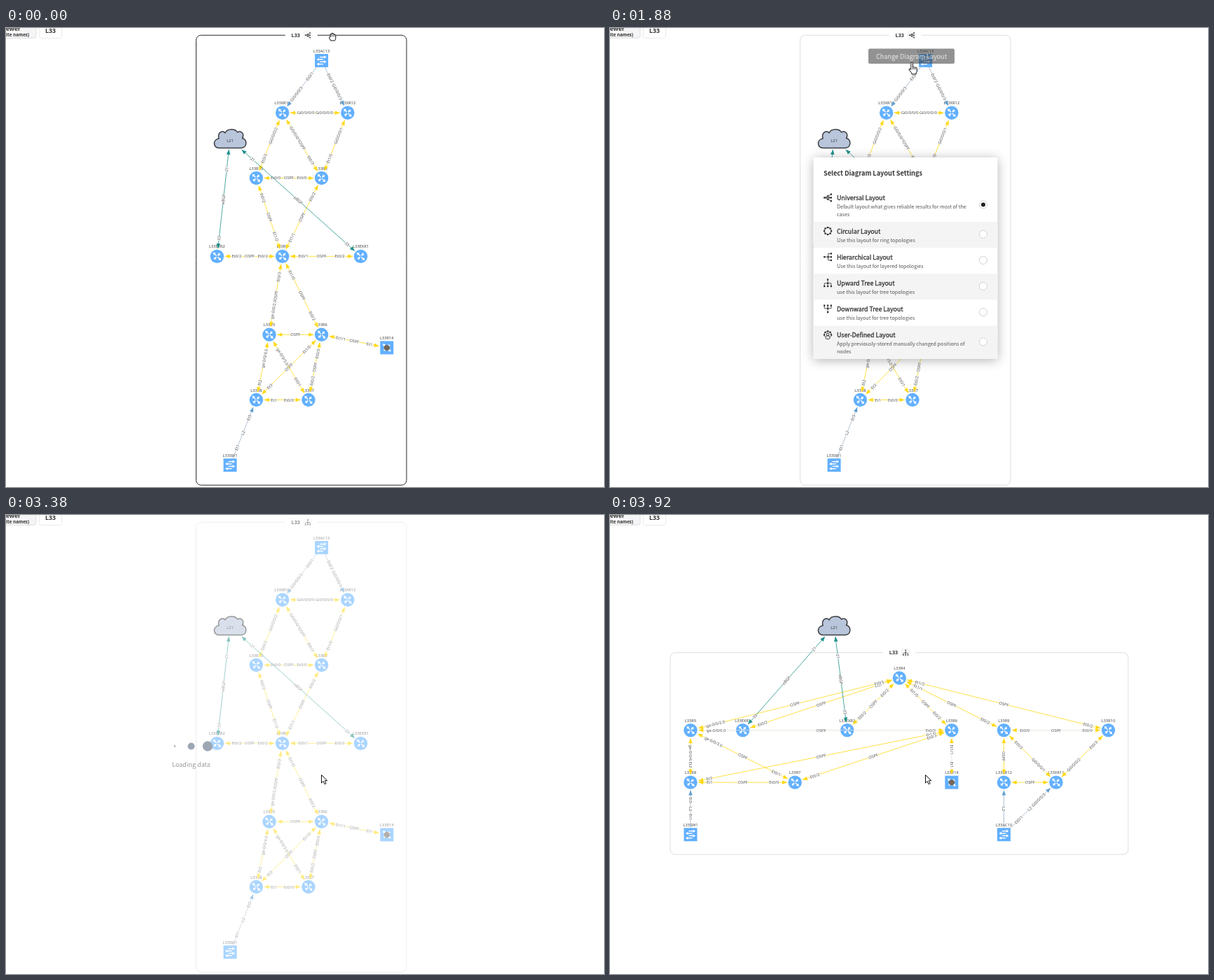
An HTML page with a canvas for the animation above (5700 ms loop, 854x656 px).

```html
<!DOCTYPE html>
<html lang="en">
<head>
<meta charset="utf-8">
<title>Diagram layout</title>
<style>
html, body { margin: 0; width: 100%; height: 100%; overflow: hidden; background: #fff; }
canvas { display: block; }
</style>
</head>
<body>
<canvas id="stage" width="854" height="656"></canvas>
<script>
const c = document.getElementById('stage').getContext('2d');
const LOOP = 5700;
const UI = '"Noto Sans CJK SC", "Noto Sans CJK JP", "Noto Sans CJK", "Noto Sans", sans-serif';
const NET = '"Noto Sans", "Open Sans", sans-serif';
const SMALL = `5.7px ${NET}`;
const BLUE = '#62b0ff', YELLOW = '#ffd814', TEAL = '#1f918a';

const clamp = v => Math.max(0, Math.min(1, v));
const ramp = (t, a, b) => clamp((t - a) / (b - a));
const ease = v => v * v * (3 - 2 * v);

// Node places in grid units
function place(spec, x0, y0, unit) {
  const nodes = { L21: { x: 320, y: 159, cloud: true } };
  for (const part of spec.split(' ')) {
    const [name, gx, gy] = part.split(',');
    nodes[name] = { x: x0 + gx * unit, y: y0 + gy * unit };
  }
  return nodes;
}
const universal = {
  nodes: place('AC13,8,0 XR11,5,4 XR12,10,4 R10,3,9 R9,8,9 EXR2,0,15 R4,5,15 EXR1,11,15 ' +
    'R5,4,21 R6,8,21 R14,13,22 R8,3,26 R7,7,26 SW1,1,31', 301.4, 46.6, 18.65),
  box: [271.5, 10.3, 300.5, 643], icon: 'universal', pale: []
};
const upward = {
  nodes: place('R4,4,0 R5,0,1 EXR1,1,1 EXR2,3,1 R6,5,1 R9,6,1 R10,8,1 R8,0,2 R7,2,2 ' +
    'R14,5,2 XR12,6,2 XR11,7,2 SW1,0,3 AC13,6,3', 115, 233, 74.58),
  box: [86, 196.7, 654, 288.5], icon: 'upward', pale: ['R5R6', 'R9R10', 'R6R14']
};

// from, to, label at start, middle and end
const links = `R4 EXR1 Et0/1 OSPF Et0/2
R4 R5 Et0/3 OSPF ge-0/0/2.0
R4 EXR2 Et0/2 OSPF Et0/2
R4 R9 Et1/1 OSPF Et0/2
R4 R10 Et1/2 OSPF Et0/2
R4 R6 Et1/0 OSPF Et0/2
R5 R6 ge-0/0/0.0 OSPF Et0/0
R6 R8 Et1/0 OSPF Et3
R6 R7 Et0/3 OSPF Et0/2
R5 R7 ge-0/0/3.0 OSPF Et0/1
R5 R8 ge-0/0/4.0 OSPF Et2
R8 R7 Et1 OSPF Et0/0
R6 R14 Et1/1 OSPF Et1
R9 R10 Et0/0 OSPF Et0/0
R9 XR12 Et1/0 OSPF Gi0/0/0/1
R9 XR11 Et0/3 OSPF Gi0/0/0/1
R10 XR11 Et0/3 OSPF Gi0/0/0/2
XR11 XR12 Gi0/0/0/0 OSPF Gi0/0/0/0
AC13 XR11 Et0/1 L2 Gi0/0/0/3
AC13 XR12 Et0/2 L2 Gi0/0/0/3
SW1 R8 Et1 L2 Et5
L21 EXR1 21 eBGP 33
L21 EXR2 21 eBGP 33`.split('\n').map(s => s.split(' '));

function text(s, x, y, font, color, align = 'center', weight = 0) {
  c.font = font;
  c.fillStyle = c.strokeStyle = color;
  c.textAlign = align;
  c.fillText(s, x, y);
  if (weight) {
    c.lineWidth = weight;
    c.strokeText(s, x, y);
  }
}
function line(color, width, ...pts) {
  c.strokeStyle = color;
  c.lineWidth = width;
  c.beginPath();
  for (let i = 0; i < pts.length; i += 2) c.lineTo(pts[i], pts[i + 1]);
  c.stroke();
}
function disc(x, y, r, color) {
  c.fillStyle = color;
  c.beginPath();
  c.arc(x, y, r, 0, 7);
  c.fill();
}
function panel(x, y, w, h, r, fill, stroke) {
  c.beginPath();
  c.roundRect(x, y, w, h, r);
  if (fill) { c.fillStyle = fill; c.fill(); }
  if (stroke) { c.strokeStyle = stroke; c.lineWidth = 1; c.stroke(); }
}
function head(x, y, angle, len, half, color) {
  c.save();
  c.translate(x, y);
  c.rotate(angle);
  c.fillStyle = color;
  c.beginPath();
  c.moveTo(0, 0);
  c.lineTo(-len, -half);
  c.lineTo(-len, half);
  c.fill();
  c.restore();
}

const cloud = new Path2D('M304 171.5C295.500 171 295 159.500 304 158C301.500 149 309.500 145.500 313 150' +
  'C315.500 143.500 327.500 143.500 330.500 149C336 146 341 151.500 337.500 157.500C345.500 160 344 171 336 171.500Z');

function drawNode(name, n) {
  if (n.cloud) {
    c.fillStyle = '#b9c5da';
    c.strokeStyle = '#3b3d42';
    c.lineWidth = 1.5;
    c.fill(cloud);
    c.stroke(cloud);
    text(name, n.x, 163, SMALL, '#333');
    return;
  }
  c.save();
  c.translate(n.x, n.y);
  const isSwitch = /AC|SW/.test(name), isSquare = isSwitch || name === 'R14';
  if (isSquare) {
    c.fillStyle = BLUE;
    c.fillRect(-9.5, -9.5, 19, 19);
  } else disc(0, 0, 9.7, BLUE);
  if (isSwitch) {
    [-5, -1.7, 1.7, 5].forEach((y, i) => {
      const dir = i % 2 ? -1 : 1;
      line('#fff', 1.4, -2.5 * dir, y, 4.5 * dir, y);
      head(7 * dir, y, dir > 0 ? 0 : Math.PI, 3.4, 2.2, '#fff');
    });
  } else {
    for (let i = 0; i < 4; i++) {
      const a = Math.PI / 4 + i * Math.PI / 2, x = Math.cos(a), y = Math.sin(a);
      line('#fff', 1.4, x * 1.2, y * 1.2, x * 6, y * 6);
      if (i % 2) head(x * 1.6, y * 1.6, a + Math.PI, 3.2, 2.2, '#fff');
      else head(x * 8, y * 8, a, 3.4, 2.4, '#fff');
    }
    if (isSquare) disc(0, 0, 4, '#75685a');
  }
  text('L33' + name, 0, -11.9, SMALL, '#444');
  c.restore();
}

function drawLink([from, to, start, mid, end], { nodes, pale }) {
  const a = nodes[from], b = nodes[to];
  const dx = b.x - a.x, dy = b.y - a.y, len = Math.hypot(dx, dy);
  const ux = dx / len, uy = dy / len, angle = Math.atan2(dy, dx);
  const tipA = a.cloud ? 14.8 / Math.abs(uy) : mid === 'L2' ? 10 : 11.3, tipB = len - 11.3;
  const at = d => [a.x + ux * d, a.y + uy * d];
  const color = mid === 'L2' ? '#9db2ca' : a.cloud ? TEAL : YELLOW;
  const tip = mid === 'L2' ? '#5f9fce' : color;
  line(pale.includes(from + to) ? '#e2e0d4' : color, .8, ...at(tipA), ...at(tipB));
  head(...at(tipB), angle, 7, 2.8, tip);
  if (mid !== 'L2') head(...at(tipA), angle + Math.PI, 7, 2.8, tip);

  c.font = SMALL;
  const [ws, wm, we] = [start, mid, end].map(s => c.measureText(s).width);
  const pad = len < 100 ? 21 : 23;
  const turn = angle > Math.PI / 2 + .001 ? angle - Math.PI
    : angle < -Math.PI / 2 + .001 ? angle + Math.PI : angle;
  const label = (s, w, d) => {
    c.save();
    c.translate(...at(d));
    c.rotate(turn);
    c.fillStyle = '#fff';
    c.fillRect(-w / 2, -2.8, w, 5.6);
    text(s, 0, 2, SMALL, '#505050');
    c.restore();
  };
  // Labels that would collide are hidden
  const ends = ws + we < len - 2 * pad + 4.5;
  if (ends) {
    label(start, ws, (a.cloud ? 40 : pad) + ws / 2);
    label(end, we, len - pad - we / 2);
  }
  if (!ends || wm / 2 + pad + Math.max(ws, we) < len / 2 + 1.3) label(mid, wm, (tipA + tipB) / 2);
}

function icon(kind, x, y, size) {
  const ink = '#333';
  const dots = (...p) => {
    for (let i = 0; i < p.length; i += 2) {
      c.fillStyle = ink;
      c.fillRect(p[i] - 1.15, p[i + 1] - 1.15, 2.3, 2.3);
    }
  };
  c.save();
  c.translate(x, y);
  c.scale(size, size);
  if (kind === 'universal') {
    line(ink, .8, 4.5, -4.5, -4.5, 0, 4.5, 4.5);
    line(ink, .8, -4.5, 0, 4.5, 0);
    line(ink, .8, 0, -2, 4.5, 0, 0, 2);
    dots(-4.8, 0, 0, -2.2, 0, 2.2, 4.8, -4.8, 4.8, 0, 4.8, 4.8);
  } else if (kind === 'circular' || kind === 'user') {
    c.strokeStyle = ink;
    c.lineWidth = .7;
    c.beginPath();
    if (kind === 'user') c.arc(0, 0, 5, 2.4, 7.1);
    else c.arc(0, 0, 5, 0, 7);
    c.stroke();
    for (let i = 0; i < 8; i++) {
      const a = i * Math.PI / 4;
      if (kind === 'circular' || i < 1 || i > 3) dots(5 * Math.cos(a), 5 * Math.sin(a));
    }
    if (kind === 'user') {
      panel(-2.8, 1.5, 5.6, 4.5, 1.5, '#fff', ink);
      c.beginPath();
      c.arc(0, -.6, 1.8, 0, 7);
      c.stroke();
    }
  } else {
    if (kind === 'hierarchical') c.rotate(-Math.PI / 2);
    if (kind === 'downward') c.scale(1, -1);
    line(ink, .8, 0, -4.8, 0, 4.8);
    line(ink, .8, -4.8, 4.8, -4.8, .5, 4.8, .5, 4.8, 4.8);
    dots(0, -4.8, 0, .5, -4.8, 4.8, 0, 4.8, 4.8, 4.8);
  }
  c.restore();
}

function drawDiagram(layout, hover) {
  const [x, y, w, h] = layout.box, mid = x + w / 2;
  const g = Math.round(222 - 180 * hover);
  panel(x, y, w, h, 7, null, `rgb(${g},${g},${g})`);
  c.fillStyle = '#fff';
  c.fillRect(mid - 23, y - 7, 46, 14);
  text('L33', mid - 8, y + 2.6, `bold 7.2px ${NET}`, '#333');
  panel(mid + 3.7, y - 5.5, 11, 11, 2, '#fafafa', '#efefef');
  for (const name in layout.nodes) drawNode(name, layout.nodes[name]);
  for (const link of links) drawLink(link, layout);
}
function drawTitleIcon(layout, kind) {
  const [x, y, w] = layout.box;
  icon(kind, x + w / 2 + 9.2, y, .68);
}

function drawHeader() {
  panel(-10, -20, 53, 34.3, 3, '#f5f5f7', '#dedee2');
  text('ewer', 0, 3.8, `bold 8.4px ${NET}`, '#333', 'left');
  text('ite names)', 0, 12, `bold 6.3px ${NET}`, '#333', 'left');
  panel(47.5, -10, 32, 24.5, 3, '#fff', '#eaeaea');
  text('L33', 63.5, 7.2, `bold 8.8px ${NET}`, '#333');
}

function drawTooltip() {
  panel(369, 29.5, 123, 21.5, 2, '#303030');
  text('Change Diagram Layout', 430.5, 44, `9.1px ${UI}`, '#fff', 'center', .3);
}

const choices = [
  ['universal', 'Universal Layout', 'Default layout what gives reliable results for most of the', 'cases'],
  ['circular', 'Circular Layout', 'Use this layout for ring topologies'],
  ['hierarchical', 'Hierarchical Layout', 'Use this layout for layered topologies'],
  ['upward', 'Upward Tree Layout', 'use this layout for tree topologies'],
  ['downward', 'Downward Tree Layout', 'use this layout for tree topologies'],
  ['user', 'User-Defined Layout', 'Apply previously-stored manually changed positions of', 'nodes']
];
function drawDialog(count, alpha) {
  const h = count === 6 ? 288 : 239, top = Math.round(328.6 - h / 2);
  const left = 290.5, width = 263;
  const scale = .9 + .1 * alpha;
  c.save();
  c.globalAlpha = alpha;
  c.translate(422, 329);
  c.scale(scale, scale);
  c.translate(-422, -329);
  c.shadowColor = 'rgba(0,0,0,.3)';
  c.shadowBlur = 16;
  c.shadowOffsetY = 2;
  panel(left, top, width, h, 2, '#fff');
  c.shadowColor = 'transparent';
  text('Select Diagram Layout Settings', 305, top + 26, `bold 9.2px ${UI}`, '#333', 'left');
  let y = top + 44;
  choices.slice(0, count).forEach(([kind, title, ...lines], i) => {
    const rowH = i ? 37.1 + 11.3 * (lines.length - 1) : 48;
    const mid = i ? y + 13.6 : y + 14;
    if (i % 2) {
      c.fillStyle = '#f4f4f4';
      c.fillRect(left, y, width, Math.min(rowH, top + h - y));
    }
    icon(kind, 311, mid - .5, 1);
    text(title, 324, mid + 3.2, `8.8px ${UI}`, '#333', 'left', .3);
    lines.forEach((s, k) => text(s, 324, mid + 15 + 11.2 * k, `7.17px ${UI}`, '#555', 'left'));
    const ry = mid + (lines.length > 1 ? 9.4 : 4.2);
    c.beginPath();
    c.arc(533, ry, 5.6, 0, 7);
    c.fillStyle = '#fff';
    c.fill();
    c.strokeStyle = '#cfcfcf';
    c.lineWidth = .9;
    c.stroke();
    if (!i) disc(533, ry, 3, '#222');
    y += rowH;
  });
  c.restore();
}

function drawLoader(t) {
  for (let i = 0; i < 3; i++) {
    const phase = (t - 3380) / 870 * 2 * Math.PI + (2 - i) * 1.15;
    disc(241 + 23.5 * i, 330.5, 7.2 * (.5 + .5 * Math.cos(phase)), '#9da7b4');
  }
  text('Loading data', 264.5, 360, `9.05px ${UI}`, '#999');
}

const pointers = {
  point: new Path2D('M-3 2V-7a1.300 1.300 0 0 1 2.600 0V-1q1-1.400 2-.2q1.200-1 2 .2q1.600-.6 1.900.8' +
    'V3.500q0 2-1.300 3.500V8.500H-2V7L-5.500 2.600q-.8-1.600.6-1.800Z'),
  grab: new Path2D('M-3.500 5.500L-5.500 1q.2-1.400 1.600-.4V-3.500q.9-1.300 1.900 0V-4.700q1-1.300 2 0' +
    'v.7q1-1.200 2 .2v1q1.200-.8 1.800.5V2q-.2 2.500-1.200 3.500Z'),
  arrow: new Path2D('M0 0V11.500L2.700 9 4.600 13.200 6.600 12.300 4.800 8.200H8.400Z')
};
const track = [[70, 467, 12.5], [400, 430, 18], [799, 430, 18], [800, 431, 18], [1810, 431, 18],
  [2350, 445, 318], [2420, 448, 345], [2630, 452, 379]];
function drawCursor(t) {
  let i = 0;
  while (i < track.length - 2 && t > track[i + 1][0]) i++;
  const [ta, xa, ya] = track[i], [tb, xb, yb] = track[i + 1], k = ramp(t, ta, tb);
  let x = xa + (xb - xa) * k, y = ya + (yb - ya) * k;
  const kind = t >= 3310 ? 'arrow' : t < 400 && x > 440 ? 'grab' : 'point';
  if (kind === 'arrow') [x, y] = [450.5, 371.5];
  c.save();
  c.translate(x, y);
  c.fillStyle = '#fff';
  c.strokeStyle = '#111';
  c.lineWidth = 1;
  c.lineJoin = 'round';
  c.fill(pointers[kind]);
  c.stroke(pointers[kind]);
  if (kind === 'point') for (const lx of [-.4, 1.6, 3.6]) line('#111', .7, lx, -.8, lx, 2);
  if (kind === 'grab') for (const lx of [-2, 0, 2]) line('#111', .7, lx, -3.5, lx, 0);
  c.restore();
}

function draw(t) {
  c.fillStyle = '#fff';
  c.fillRect(0, 0, 854, 656);
  const layout = t < 3700 ? universal : upward;
  drawDiagram(layout, 1 - ramp(t, 70, 400));
  drawTitleIcon(layout, t < 3310 ? 'universal' : 'upward');
  const veil = .46 * (ramp(t, 3200, 3380) - ramp(t, 3780, 3920));
  if (veil > 0) {
    c.fillStyle = `rgba(255,255,255,${veil})`;
    c.fillRect(0, 0, 854, 656);
  }
  drawHeader();
  const tip = ramp(t, 380, 540) - ramp(t, 1810, 1960);
  if (tip > 0) {
    c.globalAlpha = tip;
    drawTooltip();
    c.globalAlpha = 1;
  }
  const dialog = ease(ramp(t, 1040, 1300)) - ease(ramp(t, 3200, 3370));
  if (dialog > 0) drawDialog(t < 1480 ? 5 : 6, dialog);
  if (t >= 3310 && t < 3700) drawLoader(t);
  drawCursor(t);
}

c.lineJoin = 'round';
function frame() {
  draw(performance.now() % LOOP);
  requestAnimationFrame(frame);
}
frame();
</script>
</body>
</html>
```
